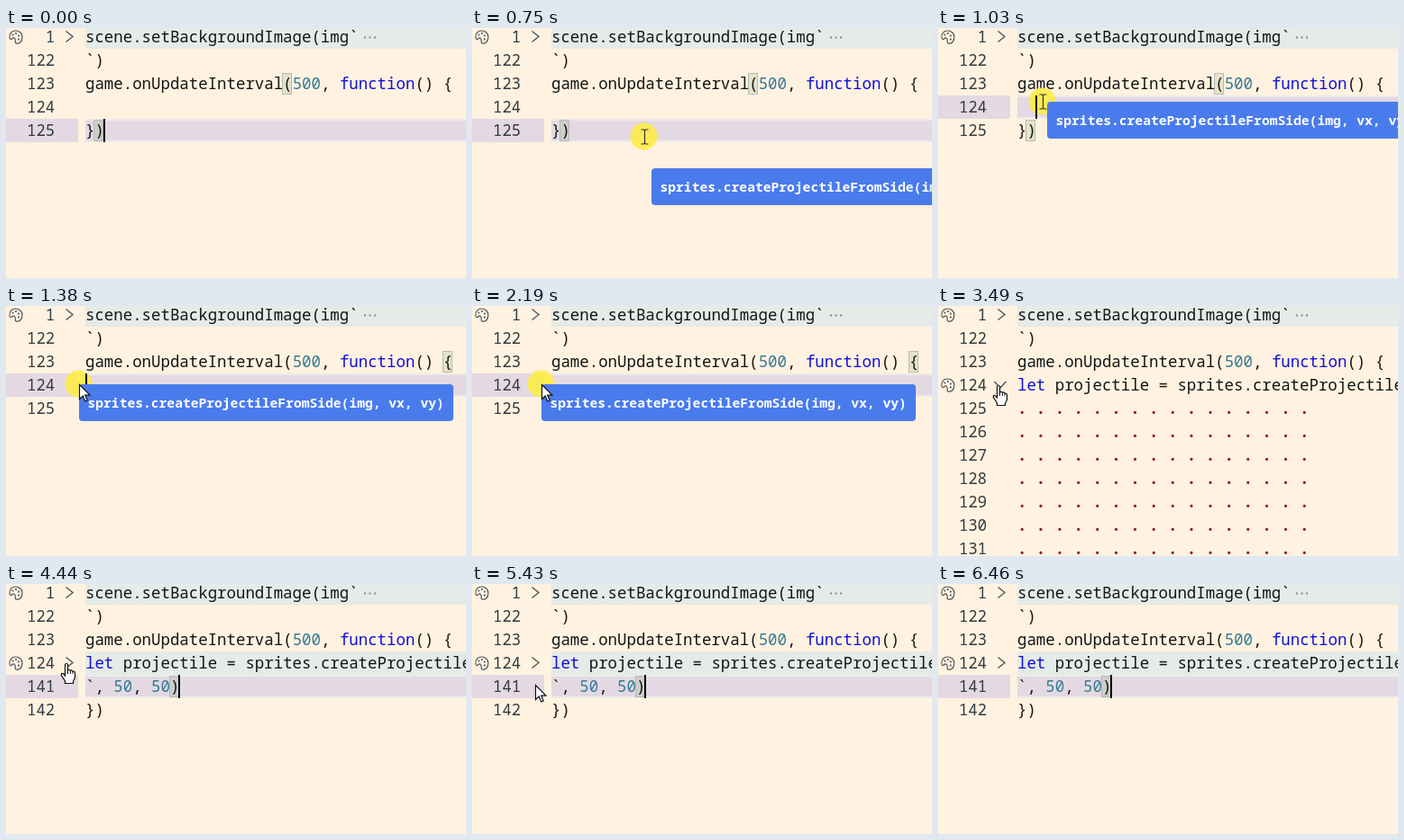
Recreate the animation shown at these times as an HTML page with a canvas. Size 510 px wide and 278 px high, loop 6.66 s.

```html
<!DOCTYPE html>
<html lang="en">
<head>
<meta charset="utf-8">
<title>Code editor</title>
<style>
html, body { margin: 0; width: 100%; height: 100%; overflow: hidden; background: #fff2e0; }
canvas { display: block; }
</style>
</head>
<body>
<canvas id="stage" width="510" height="278"></canvas>
<script>
const ctx = document.getElementById('stage').getContext('2d');
const LOOP = 6660, LEFT = 88, COL = 10.44, ROW = 26;
const MONO = '"Noto Sans Mono", "DejaVu Sans Mono", monospace';
const CODE_FONT = COL / 0.6 + 'px ' + MONO;
const BLOCK_FONT = 'bold 14.65px ' + MONO;
const INK = '#151515', BLUE = '#1010dc', NUM = '#337a96', RED = '#8f2318', ICON = '#50555e';
const FOLD_BG = '#e5ebe6', LINE_BG = '#e4d9e2', LINE_EDGE = '#eeebea';
const DOTS = '. '.repeat(16);

// Each key is [time, x, y]; a position holds until the next key.
const DRAG = [
  [680, 262, 185], [750, 191, 121], [820, 160, 104], [890, 138, 92],
  [960, 125, 85], [1030, 116, 82], [1100, 107, 82], [1170, 98, 84],
  [1240, 89, 86], [1310, 82, 87], [1380, 81, 87], [1450, 80, 87],
  [1520, 79, 87], [1660, 78, 87], [1790, 77, 87]
];
const BLOCK = [[680, 318, 238], [750, 199, 156], [820, 168, 118], [890, 145, 97], [960, 131, 87], [1030, 121, 82]];
const RETURN = [
  [2940, 229, 98], [3010, 212, 98], [3080, 180, 98], [3150, 146, 97],
  [3220, 115, 97], [3290, 92, 96], [3420, 74, 91], [3490, 67, 88]
];
const LEAVE = [[5430, 70, 112], [5500, 86, 180]];

const rowY = row => 10 + row * ROW;
const colX = col => LEFT + col * COL;
const within = (t, a, b) => t >= a && t < b;

function at(keys, t) {
  let pos = keys[0];
  for (const key of keys) if (t >= key[0]) pos = key;
  return { x: pos[1], y: pos[2] };
}

function rect(x, y, w, h, color) {
  ctx.fillStyle = color;
  ctx.fillRect(x, y, w, h);
}

function stroke(points, color, width) {
  ctx.beginPath();
  points.forEach(([x, y]) => ctx.lineTo(x, y));
  ctx.strokeStyle = color;
  ctx.lineWidth = width;
  ctx.stroke();
}

function code(row, ...parts) {
  ctx.font = CODE_FONT;
  let col = 0;
  for (const [text, color = INK] of parts) {
    ctx.fillStyle = color;
    ctx.fillText(text, colX(col), rowY(row) + 6);
    col += text.length;
  }
}

function dots(row) {
  ctx.font = 'bold ' + CODE_FONT;
  ctx.fillStyle = RED;
  ctx.fillText(DOTS, LEFT, rowY(row) + 6);
}

function lineNumber(row, n) {
  ctx.font = CODE_FONT;
  ctx.fillStyle = '#333b42';
  ctx.textAlign = 'right';
  ctx.fillText(n, 54.3, rowY(row) + 6);
  ctx.textAlign = 'left';
}

const foldBand = row => rect(LEFT, rowY(row) - 13, 510, ROW, FOLD_BG);

function activeLine(row) {
  const y = rowY(row) - 13;
  rect(0, y, 80, ROW, LINE_BG);
  rect(LEFT, y, 510, ROW, LINE_EDGE);
  rect(LEFT, y + 2, 510, ROW - 4, LINE_BG);
}

// The caret sits just before its column but never leaves the text area.
const caret = (row, col) =>
  rect(Math.max(LEFT, Math.floor(colX(col) - 0.5)), rowY(row) - 13, 2, ROW, '#000');

function bracket(row, col) {
  const x = Math.floor(colX(col) - 0.5), y = rowY(row) - 12;
  rect(x, y, 11, 24, 'rgba(0, 100, 0, 0.1)');
  ctx.strokeStyle = '#b9b9b9';
  ctx.lineWidth = 1;
  ctx.strokeRect(x + 0.5, y + 0.5, 10, 23);
}

function palette(row) {
  const y = rowY(row);
  ctx.beginPath();
  ctx.moveTo(4, y + 1);
  ctx.bezierCurveTo(3, y - 10, 18, y - 9, 18, y);
  ctx.bezierCurveTo(18, y + 5, 15, y + 8, 11, y + 7);
  ctx.bezierCurveTo(9, y + 6, 12, y + 3, 9, y + 1);
  ctx.bezierCurveTo(7, y, 6, y + 5, 4, y + 1);
  ctx.strokeStyle = ICON;
  ctx.lineWidth = 1.2;
  ctx.stroke();
  for (const [x, dy] of [[7.5, -2.5], [11, -4], [14, -1.5], [14, 2.5]]) rect(x - 0.9, y + dy - 0.9, 1.8, 1.8, ICON);
}

function chevron(row, open) {
  const y = rowY(row);
  const points = open
    ? [[62.5, y - 4], [69, y + 3], [75.5, y - 4]]
    : [[66.5, y - 6.5], [74, y - 0.5], [66.5, y + 5.5]];
  stroke(points, ICON, 1.4);
}

function beam(x, y) {
  for (const side of [-1, 1]) {
    stroke([[x + 4 * side, y - 8], [x + side, y - 8], [x, y - 7], [x, y + 7], [x + side, y + 8], [x + 4 * side, y + 8]], '#333', 1.1);
  }
}

function shape(x, y, d) {
  const path = new Path2D(d);
  ctx.save();
  ctx.translate(x, y);
  ctx.fillStyle = '#fff';
  ctx.fill(path);
  ctx.strokeStyle = '#111';
  ctx.lineWidth = 1.2;
  ctx.stroke(path);
  ctx.restore();
}

const arrow = (x, y) => shape(x, y, 'M.5 .5V16.5L4.2 13L6.8 19L9.2 18L6.7 12.2H12Z');

function hand(x, y) {
  shape(x, y, 'M-1.5 1.5Q0 -1 1.5 1.5V8Q3 6.5 4.4 8.4Q6 7.2 7 9.2Q9 8.6 9.5 11V16Q9 18 7.5 20V22.5H-1.5V20L-5.6 13.5Q-6 11 -3.8 11.5L-1.5 14Z');
  for (const [dx, dy] of [[1.5, 8], [4.4, 8.5], [7, 9.5]]) stroke([[x + dx, y + dy], [x + dx, y + 12]], '#111', 1);
}

function halo({ x, y }) {
  ctx.beginPath();
  ctx.arc(x - 0.5, y - 0.5, 15, 0, Math.PI * 2);
  ctx.fillStyle = 'rgba(255, 236, 62, 0.85)';
  ctx.fill();
}

function block({ x, y }) {
  ctx.beginPath();
  ctx.roundRect(x, y, 415, 41, 4);
  ctx.fillStyle = '#4a7bec';
  ctx.fill();
  ctx.font = BLOCK_FONT;
  ctx.fillStyle = '#fff';
  ctx.fillText('sprites.createProjectileFromSide(img, vx, vy)', x + 9.5, y + 25.5);
}

function header(icon) {
  foldBand(0);
  if (icon) palette(0);
  chevron(0, false);
  lineNumber(0, 1);
  lineNumber(1, 122);
  lineNumber(2, 123);
  code(0, ['scene.setBackgroundImage(img`']);
  for (let i = 0; i < 3; i++) rect(397 + i * 5.5, 9.5, 2, 2, '#85888a');
  code(1, ['`)']);
  code(2, ['game.onUpdateInterval('], ['500', NUM], [', '], ['function', BLUE], ['() {']);
}

const declaration = () =>
  code(3, ['let', BLUE], [' projectile = sprites.createProjectileFromSide(img`']);

function emptyScene(t) {
  const mouse = at(DRAG, t);
  const dragging = t >= 680, over = t >= 890, settled = t >= 1240;
  activeLine(over ? 3 : 4);
  if (settled) {
    bracket(2, 38);
  } else {
    bracket(2, 21);
    bracket(4, 1);
  }
  header(true);
  lineNumber(3, 124);
  lineNumber(4, 125);
  code(4, ['})']);
  if (t < 410) caret(4, 2);
  if (dragging && t < 2390) halo(mouse);
  if (within(t, 890, 2190)) caret(3, settled ? 0 : mouse.x > 110 ? 2 : 1);
  if (!dragging) return;
  if (t < 2390) block(t < 1100 ? at(BLOCK, t) : mouse);
  if (t >= 2390) arrow(77, 92);
  else if (mouse.x > 84) beam(mouse.x + 0.5, mouse.y);
  else arrow(mouse.x, mouse.y);
}

function openScene(t) {
  const ready = t >= 2610;
  header(ready);
  if (ready) {
    palette(3);
    chevron(3, true);
  }
  declaration();
  lineNumber(3, 124);
  for (let row = 4; row <= 10; row++) {
    lineNumber(row, 121 + row);
    dots(row);
  }
  if (!ready) arrow(77, 92);
  if (t < 2940) return;
  const { x, y } = at(RETURN, t);
  if (x > 80) beam(x, y);
  else hand(x, y);
}

function foldedScene(t) {
  const ready = t >= 4440;
  foldBand(3);
  if (ready) {
    activeLine(4);
    bracket(4, 9);
  }
  header(true);
  palette(3);
  chevron(3, false);
  declaration();
  lineNumber(3, 124);
  lineNumber(4, 141);
  lineNumber(5, 142);
  code(4, ['`, '], ['50', NUM], [', '], ['50', NUM], [')']);
  code(5, ['})']);
  if (within(t, 4440, 4970) || within(t, 5430, 5960) || t >= 6460) caret(4, 10);
  if (t < 5430) {
    hand(67, 88);
  } else if (t < 5630) {
    const { x, y } = at(LEAVE, t);
    if (x > 80) beam(x, y);
    else arrow(x, y);
  }
}

function draw(t) {
  rect(0, 0, 510, 278, '#fff2e0');
  if (t < 2460) emptyScene(t);
  else if (t < 4370) openScene(t);
  else foldedScene(t);
}

const start = performance.now();
function tick() {
  draw((performance.now() - start) % LOOP);
  requestAnimationFrame(tick);
}
tick();
</script>
</body>
</html>
```
